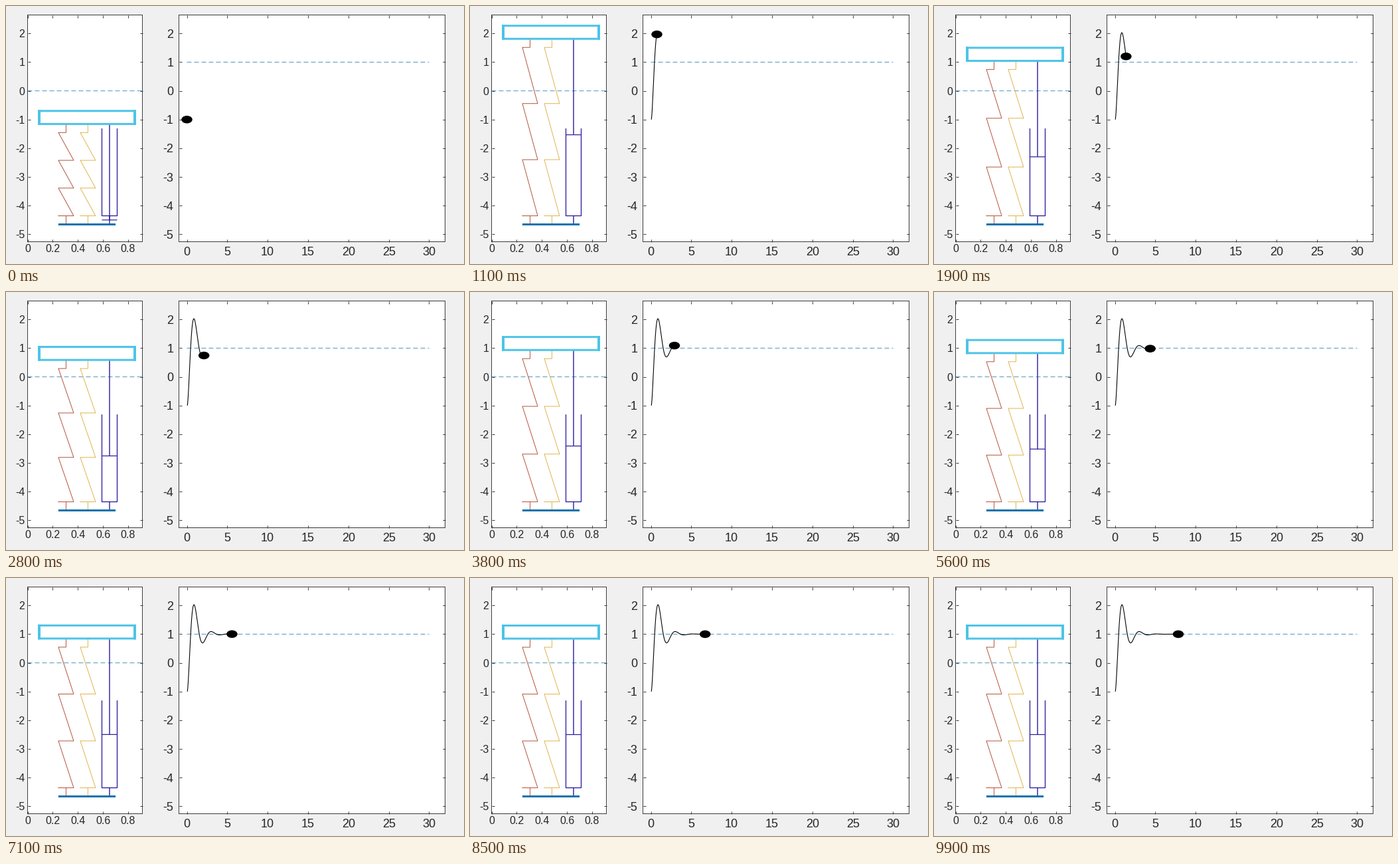
A matplotlib script that plays this animation: 690x388 px, repeating every 10000 ms.

```python
import numpy as np
import matplotlib.pyplot as plt
from matplotlib.animation import FuncAnimation
from matplotlib.patches import Ellipse, Rectangle

W, H, DPI = 690, 388, 100
FRAMES, INTERVAL = 100, 100
PX = 72 / DPI          # one pixel in points
UX_L, UX_R, UY = 189.4, 12.165, 43.15   # pixels per data unit
TOP, BOTTOM, ZERO_Y = 13.5, 354.5, 127.6

CYAN, BASE_BLUE, DASH_BLUE = "#4dc4e8", "#0d72ad", "#5496c0"
RED, YELLOW, NAVY, FRAME = "#b5563f", "#e0b551", "#2a1a9c", "#3c3c3c"

FLOOR, BARREL = -4.655, -4.355

plt.rcParams["font.family"] = "Liberation Sans"
plt.rcParams["path.snap"] = False

fig = plt.figure(figsize=(W / DPI, H / DPI), dpi=DPI, facecolor="#f0f0f0")


def make_axes(left, right, zero, unit, xticks, size, pad_x, pad_y):
    ax = fig.add_axes([left / W, 1 - BOTTOM / H,
                       (right - left) / W, (BOTTOM - TOP) / H])
    ax.set_xlim((left - zero) / unit, (right - zero) / unit)
    ax.set_ylim((ZERO_Y - BOTTOM) / UY, (ZERO_Y - TOP) / UY)
    yticks = range(-5, 3)
    ax.set_xticks(xticks, [f"{v:g}" for v in xticks])
    ax.set_yticks(yticks, [str(v) for v in yticks])
    ax.tick_params(direction="in", top=True, right=True, length=4 * PX,
                   width=PX, color=FRAME, labelcolor="#262626",
                   labelsize=size * PX)
    ax.tick_params(axis="x", pad=pad_x * PX)
    ax.tick_params(axis="y", pad=pad_y * PX)
    for spine in ax.spines.values():
        spine.set(linewidth=PX, color=FRAME)
    return ax


def line(ax, x, y, color, width=1.0, **kw):
    return ax.plot(x, y, color=color, lw=width * PX,
                   solid_capstyle="butt", **kw)[0]


def height(t):
    """Damped swing from -1 to 1 that starts at rest."""
    sigma, omega, lag, amp = 1.13, 2.94, 0.225, 3.43

    def swing(s):
        wave = np.cos(omega * s) + sigma / omega * np.sin(omega * s)
        return -amp * np.exp(-sigma * s) * wave

    fade = (-2 - swing(lag)) * np.exp(-7.5 * t)
    return 1 + swing(t + lag) + fade


def spring_points(x, top):
    half = 11.5 / UX_L
    levels = np.linspace(top - 0.3, BARREL, 4)
    xs, ys = [x, x, x - half], [top, levels[0], levels[0]]
    for y in levels[1:]:
        xs += [x + half, x - half]
        ys += [y, y]
    return xs + [x, x], ys + [BARREL, FLOOR]


rig = make_axes(32.5, 205.5, 32.5, UX_L, [0, 0.2, 0.4, 0.6, 0.8], 16, 4, 4)
plot = make_axes(260.5, 661.5, 272.5, UX_R, range(0, 31, 5), 18, 7.5, 8)

# Fixed parts
dashes = dict(dashes=(7, 4), dash_capstyle="butt")
line(rig, [0, 173 / UX_L], [0, 0], DASH_BLUE, **dashes)
line(plot, [0, 30], [1, 1], DASH_BLUE, **dashes)

ROD = 0.652
HALF = 11.5 / UX_L
line(rig, [ROD - HALF, ROD - HALF, ROD + HALF, ROD + HALF],
     [-1.31, BARREL, BARREL, -1.31], NAVY, 1.3)
line(rig, [ROD, ROD], [BARREL, FLOOR], NAVY, 1.4)

# Moving parts
BOX = (0.0924, 0.8527)
box = rig.add_patch(Rectangle((BOX[0], 0), BOX[1] - BOX[0], 0.455, fill=False,
                              ec=CYAN, lw=3 * PX, joinstyle="miter", zorder=3))
sides = [line(rig, [x, x], [0, 0], CYAN, 4, zorder=3) for x in BOX]
springs = [(x, line(rig, [], [], c)) for x, c in ((0.306, RED), (0.48, YELLOW))]
rod = line(rig, [], [], NAVY, 1.4)
plate = line(rig, [], [], NAVY, 1.2)
line(rig, [0.245, 0.7], [FLOOR, FLOOR], BASE_BLUE, 3, zorder=4)

trace = line(plot, [], [], "black", 1.1)
ball = plot.add_patch(Ellipse((0, -1), 16.5 / UX_R, 11.5 / UY,
                              color="black", lw=0, zorder=4))


def draw(i):
    t = max(0.0, 0.0808 * (i - 1.85))
    y = height(t)
    low, high = y - 0.155, y + 0.3
    box.set_y(low)
    for x, side in zip(BOX, sides):
        side.set_data([x, x], [low - 1.5 / UY, high + 1.5 / UY])
    for x, spring in springs:
        spring.set_data(*spring_points(x, low))
    rod.set_data([ROD, ROD], [low, y - 3.5])
    plate.set_data([ROD - HALF, ROD + HALF], [y - 3.5, y - 3.5])
    ts = np.linspace(0, t, 300)
    trace.set_data(ts + 0.04 * (1 - ts / max(t, 0.04)), height(ts))
    ball.center = (t, y)
    return [box, *sides, *(s for _, s in springs), rod, plate, trace, ball]


anim = FuncAnimation(fig, draw, frames=FRAMES, interval=INTERVAL,
                     init_func=lambda: draw(0), repeat=True, repeat_delay=0)
plt.show()
```
